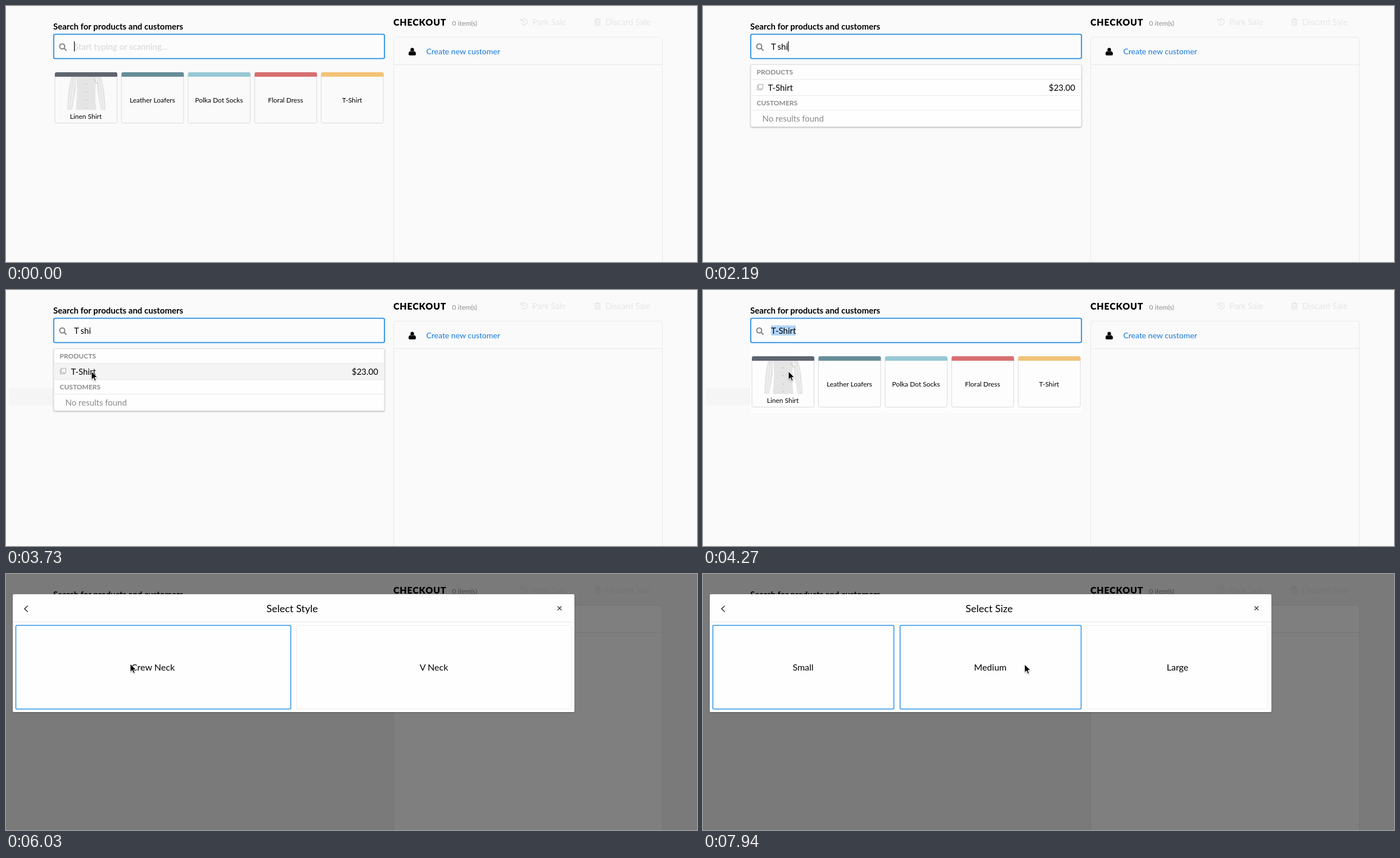
Write an HTML page that moves like this. It is 1229 px wide and 456 px high and loops after 8 s.

```html
<!DOCTYPE html>
<html lang="en">
<head>
<meta charset="utf-8">
<title>Checkout search</title>
<style>
  html, body { margin: 0; width: 100%; height: 100%; overflow: hidden; background: #fafafa; }
  svg { display: block; width: 100vw; height: 100vh; }
  text { font: 15px Lato, "Open Sans", sans-serif; white-space: pre; }
  .bold { font-weight: 700; }
  .mid { text-anchor: middle; }
  .end { text-anchor: end; }
  .small { font-size: 12px; }
  .grey { fill: #8a8a8a; }
  .title { font-size: 18px; }
  .option text { font-size: 16px; text-anchor: middle; }
  .option rect { fill: none; stroke: #ececec; }
  .option .active { stroke: #2690e4; stroke-width: 1.5; }
  .faint { fill: #e6e6e6; }
  .faint path { fill: none; stroke: #e6e6e6; stroke-width: 1.5; }
  .line { stroke: #e8e8e8; fill: none; }
  .tile rect { fill: none; stroke: #d9d9d9; }
  .tile text { font-size: 12px; text-anchor: middle; }

  /* One 8 s clock; 1% is 80 ms. */
  [class*="t-"] { animation: 8s step-end infinite; }
  .t-page { animation-name: page; }
  .t-panel { animation-name: panel; }
  .t-caret { animation-name: caret; }
  .t-prompt { animation-name: prompt; }
  .t-typed { animation-name: typed; }
  .t-hint { animation-name: hint; }
  .t-s { animation-name: key-s; }
  .t-h { animation-name: key-h; }
  .t-i { animation-name: key-i; }
  .t-chosen { animation-name: chosen; }
  .t-tiles { animation-name: tiles; }
  .t-drop { animation-name: drop; }
  .t-match { animation-name: match; }
  .t-row { animation-name: row; }
  .t-side { animation-name: side; }
  .t-modal { animation-name: modal; }
  .t-colour { animation-name: colour; }
  .t-style { animation-name: style; }
  .t-size { animation-name: size; }
  .t-crew { animation-name: crew; }
  .t-vneck { animation-name: vneck; }
  .t-back { animation-name: back; }
  .t-pointer { animation-name: pointer; animation-timing-function: linear; }

  .t-typed, .t-hint, .t-s, .t-h, .t-i, .t-chosen, .t-drop, .t-row, .t-side,
  .t-modal, .t-style, .t-size, .t-vneck, .t-back { opacity: 0; }

  @keyframes page { 0% { fill: #fafafa } 54.125%, 100% { fill: #f5f5f5 } }
  @keyframes panel { 0% { fill: #fafafa } 54.125%, 100% { fill: #fff } }
  @keyframes caret {
    0% { transform: none; opacity: 1 }
    2.25% { transform: none; opacity: 0 }
    8.625% { transform: none; opacity: 1 }
    14.625% { transform: translateX(9px); opacity: 1 }
    18.375% { transform: translateX(11px); opacity: 1 }
    22.875% { transform: translateX(18px); opacity: 1 }
    24.375% { transform: translateX(26px); opacity: 1 }
    27.375% { transform: translateX(30px); opacity: 1 }
    34.75% { transform: translateX(30px); opacity: 0 }
    41.5% { transform: translateX(30px); opacity: 1 }
    46.625%, 100% { transform: translateX(30px); opacity: 0 }
  }
  @keyframes prompt { 14.625%, 100% { opacity: 0 } }
  @keyframes typed { 14.625% { opacity: 1 } 53.375% { opacity: 0 } }
  @keyframes hint { 17.625% { opacity: 1 } 18.375% { opacity: 0 } }
  @keyframes key-s { 22.875%, 100% { opacity: 1 } }
  @keyframes key-h { 24.375%, 100% { opacity: 1 } }
  @keyframes key-i { 27.375%, 100% { opacity: 1 } }
  @keyframes chosen { 53.375%, 100% { opacity: 1 } }
  @keyframes tiles { 16.875% { opacity: 0 } 53.375% { opacity: 1 } }
  @keyframes drop { 16.875% { opacity: 1 } 53.375% { opacity: 0 } }
  @keyframes match { 0% { font-weight: 700 } 19.875%, 100% { font-weight: 400 } }
  @keyframes row { 42.25%, 100% { opacity: 1 } }
  @keyframes side { 39.25% { opacity: 1 } 54.125% { opacity: 0 } }
  @keyframes modal { 54.125%, 100% { opacity: 1 } }
  @keyframes colour { 75.375%, 100% { opacity: 0 } }
  @keyframes style { 75.375% { opacity: 1 } 99.25% { opacity: 0 } }
  @keyframes size { 99.25%, 100% { opacity: 1 } }
  @keyframes crew { 97%, 100% { opacity: 0 } }
  @keyframes vneck { 88.125%, 100% { opacity: 1 } }
  @keyframes back { 75.375%, 100% { opacity: 1 } }
  @keyframes pointer {
    0% { transform: translate(-30px, 205px) }
    39.25% { transform: translate(-30px, 205px); animation-timing-function: steps(4, start) }
    42.25% { transform: translate(148px, 160px); animation-timing-function: steps(5, start) }
    46% { transform: translate(152px, 145px) }
    65.375% { transform: translate(152px, 145px); animation-timing-function: steps(6, start) }
    70.125% { transform: translate(221px, 160px) }
    80.625% { transform: translate(221px, 160px); animation-timing-function: steps(4, start) }
    83.625% { transform: translate(290px, 161px); animation-timing-function: steps(6, start) }
    88.125% { transform: translate(510px, 161px); animation-timing-function: steps(4, start) }
    91.125%, 100% { transform: translate(572px, 161px) }
  }
</style>
</head>
<body>
<svg viewBox="0 0 1229 456">
  <defs>
    <filter id="soft" x="-50%" y="-50%" width="200%" height="200%">
      <feDropShadow dx="0" dy="1" stdDeviation="1" flood-opacity=".35"/>
    </filter>
    <filter id="glow" x="-5%" y="-20%" width="110%" height="140%">
      <feDropShadow dx="0" dy="0" stdDeviation="1" flood-color="#1b86e0" flood-opacity=".5"/>
    </filter>
    <rect id="third" width="322" height="149" rx="2"/>
    <rect id="half" width="489" height="149" rx="2"/>
  </defs>

  <rect class="t-page" width="1229" height="456"/>
  <rect class="t-side" x="5" y="175" width="90" height="31" rx="3" fill="#f5f5f5"/>

  <!-- Checkout column -->
  <text x="689" y="35" style="font-size:16px;font-weight:900;letter-spacing:.8px">CHECKOUT</text>
  <text class="small grey" x="793.5" y="35">0 item(s)</text>
  <g class="faint">
    <path d="M916.5 25.5A5.6 5.6 0 1 1 917 31.500M915.500 22.500v3.500h3.500M921.500 25v4h-2.500"/>
    <text x="936" y="34">Park Sale</text>
    <path d="M1046.500 24.500h11M1050 24v-1.500h4V24M1048 25v9h8v-9M1050.500 27v5M1053.500 27v5"/>
    <text x="1066" y="34">Discard Sale</text>
  </g>
  <rect class="line t-panel" x="689.5" y="55.5" width="478" height="420" rx="4"/>
  <path class="line" d="M690 104.500H1167"/>
  <ellipse cx="722.500" cy="78" rx="3.200" ry="3.600"/>
  <path d="M716 85.500Q716 81 719.200 80.500Q722.500 83 725.800 80.500Q729 81 729 85.500Q729 88 726.500 88H718.500Q716 88 716 85.500Z"/>
  <text x="747.500" y="86" fill="#1577dc" style="font-size:14px">Create new customer</text>

  <!-- Search field -->
  <text class="bold" x="84" y="42">Search for products and customers</text>
  <rect x="85" y="50.500" width="588" height="43" rx="2.500" fill="#fcfcfc" stroke="#1b86e0" stroke-width="1.600" filter="url(#glow)"/>
  <g fill="none" stroke="#808080" stroke-width="2">
    <circle cx="100" cy="72" r="4.500"/>
    <path d="M103.300 75.300L107.500 79.500"/>
  </g>
  <text class="t-prompt" x="121" y="78" fill="#d6d6d6">Start typing or scanning...</text>
  <text class="t-hint" x="121" y="78" fill="#aaa">T-Shirt</text>
  <g class="t-typed">
    <text x="121" y="78">T</text>
    <text class="t-s" x="132.500" y="78">s</text>
    <text class="t-h" x="139" y="78">h</text>
    <text class="t-i" x="147.500" y="78">i</text>
  </g>
  <g class="t-chosen">
    <rect x="121" y="63" width="44" height="18" fill="#b2d6fd"/>
    <text x="121" y="78">T-Shirt</text>
    <rect x="84" y="96" width="590" height="123" fill="#fdfdfd"/>
  </g>
  <rect class="t-caret" x="121" y="63" width="1.200" height="18"/>

  <!-- Quick product tiles -->
  <g class="t-tiles">
    <g fill="#e5e5e5">
      <path d="M116 126H124.500L124 150L117.500 185H109Q110 146 116 126Z"/>
      <path d="M125 126H161Q157 152 160.500 185H124Q128 152 125 126Z"/>
      <path d="M161.500 126H169Q176 146 177 185H168.500L162.500 150Z"/>
      <path d="M122 129L115 184M117 134L112 180M164 129L171 184M169 134L174 180" fill="none" stroke="#f3f3f3" stroke-width="1.500"/>
      <path d="M156 130q4 7 8 9M141 138.500h3M141 152.500h3M141 167.500h3M141 181h3" fill="none" stroke="#c8c8c8" stroke-width="1.500"/>
    </g>
    <g class="tile">
      <rect x="87" y="118.500" width="110.500" height="90" rx="3"/>
      <path d="M87 126V121q0-3 3-3H195q3 0 3 3V126Z" fill="#5f656f"/>
      <text x="142" y="201">Linen Shirt</text>
    </g>
    <g class="tile" transform="translate(118.400)">
      <rect x="87" y="118.500" width="110.500" height="90" rx="3"/>
      <path d="M87 126V121q0-3 3-3H195q3 0 3 3V126Z" fill="#668d99"/>
      <text x="142" y="172">Leather Loafers</text>
    </g>
    <g class="tile" transform="translate(236.800)">
      <rect x="87" y="118.500" width="110.500" height="90" rx="3"/>
      <path d="M87 126V121q0-3 3-3H195q3 0 3 3V126Z" fill="#98c8d4"/>
      <text x="142" y="172">Polka Dot Socks</text>
    </g>
    <g class="tile" transform="translate(355.200)">
      <rect x="87" y="118.500" width="110.500" height="90" rx="3"/>
      <path d="M87 126V121q0-3 3-3H195q3 0 3 3V126Z" fill="#d86f70"/>
      <text x="142" y="172">Floral Dress</text>
    </g>
    <g class="tile" transform="translate(473.600)">
      <rect x="87" y="118.500" width="110.500" height="90" rx="3"/>
      <path d="M87 126V121q0-3 3-3H195q3 0 3 3V126Z" fill="#f2c277"/>
      <text x="142" y="172">T-Shirt</text>
    </g>
  </g>

  <!-- Search results -->
  <g class="t-drop">
    <rect x="85" y="104.500" width="588" height="110.500" rx="2" fill="#fefefe" stroke="#dedede" filter="url(#soft)"/>
    <rect class="t-row" x="86" y="131" width="586" height="28" fill="#f4f4f4"/>
    <path class="line" d="M86 130.500H673M86 159.500H673M86 185.500H673"/>
    <text class="small bold grey" x="95.500" y="122">PRODUCTS</text>
    <path d="M98.500 139.500h8v8h-8zM98.500 141.500h-2v8h8v-2" fill="none" stroke="#aaa"/>
    <text x="115.500" y="151"><tspan class="t-match">T</tspan>-Shir<tspan class="t-match">t</tspan></text>
    <text class="end" x="662" y="151">$23.00</text>
    <text class="small bold grey" x="95.500" y="177">CUSTOMERS</text>
    <text class="grey" x="105.500" y="206">No results found</text>
  </g>

  <!-- Option dialog -->
  <g class="t-modal">
    <rect width="1229" height="456" fill-opacity=".5"/>
    <rect x="12" y="36" width="999" height="210" rx="2.500" fill="#fefefe" filter="url(#soft)"/>
    <path class="line" d="M12 85.500H1011"/>
    <path d="M981 57.500l7 7m0-7l-7 7" fill="none" stroke="#333" stroke-width="1.300"/>
    <path class="t-back" d="M38.800 56.500L33 62L38.800 67.500" fill="none" stroke="#333" stroke-width="1.600"/>

    <g class="option t-colour">
      <text class="title" x="505" y="68" style="font-size:18px">Select Colour</text>
      <rect class="active" x="17.500" y="91.500" width="322" height="149" rx="2"/>
      <rect x="350.500" y="91.500" width="322" height="149" rx="2"/>
      <rect x="682.500" y="91.500" width="322" height="149" rx="2"/>
      <text x="178" y="172">Red</text>
      <text x="511" y="172">Green</text>
      <text x="844" y="172">Blue</text>
    </g>

    <g class="option t-style">
      <text class="title" x="509" y="68" style="font-size:18px">Select Style</text>
      <rect x="17.500" y="91.500" width="489" height="149" rx="2"/>
      <rect x="516.500" y="91.500" width="489" height="149" rx="2"/>
      <rect class="active t-crew" x="17.500" y="91.500" width="489" height="149" rx="2"/>
      <rect class="active t-vneck" x="516.500" y="91.500" width="489" height="149" rx="2"/>
      <text x="261.500" y="172">Crew Neck</text>
      <text x="761" y="172">V Neck</text>
    </g>

    <g class="option t-size">
      <text class="title" x="509" y="68" style="font-size:18px">Select Size</text>
      <rect class="active" x="17.500" y="91.500" width="322" height="149" rx="2"/>
      <rect class="active" x="350.500" y="91.500" width="322" height="149" rx="2"/>
      <rect x="682.500" y="91.500" width="322" height="149" rx="2"/>
      <text x="178" y="172">Small</text>
      <text x="511" y="172">Medium</text>
      <text x="844" y="172">Large</text>
    </g>
  </g>

  <g class="t-pointer">
    <path d="M0 0V14.500L3.400 11.500L5.800 17L8.200 16L5.900 10.500H10.500Z" stroke="#fff" stroke-width="1" filter="url(#soft)"/>
  </g>
</svg>
</body>
</html>
```
